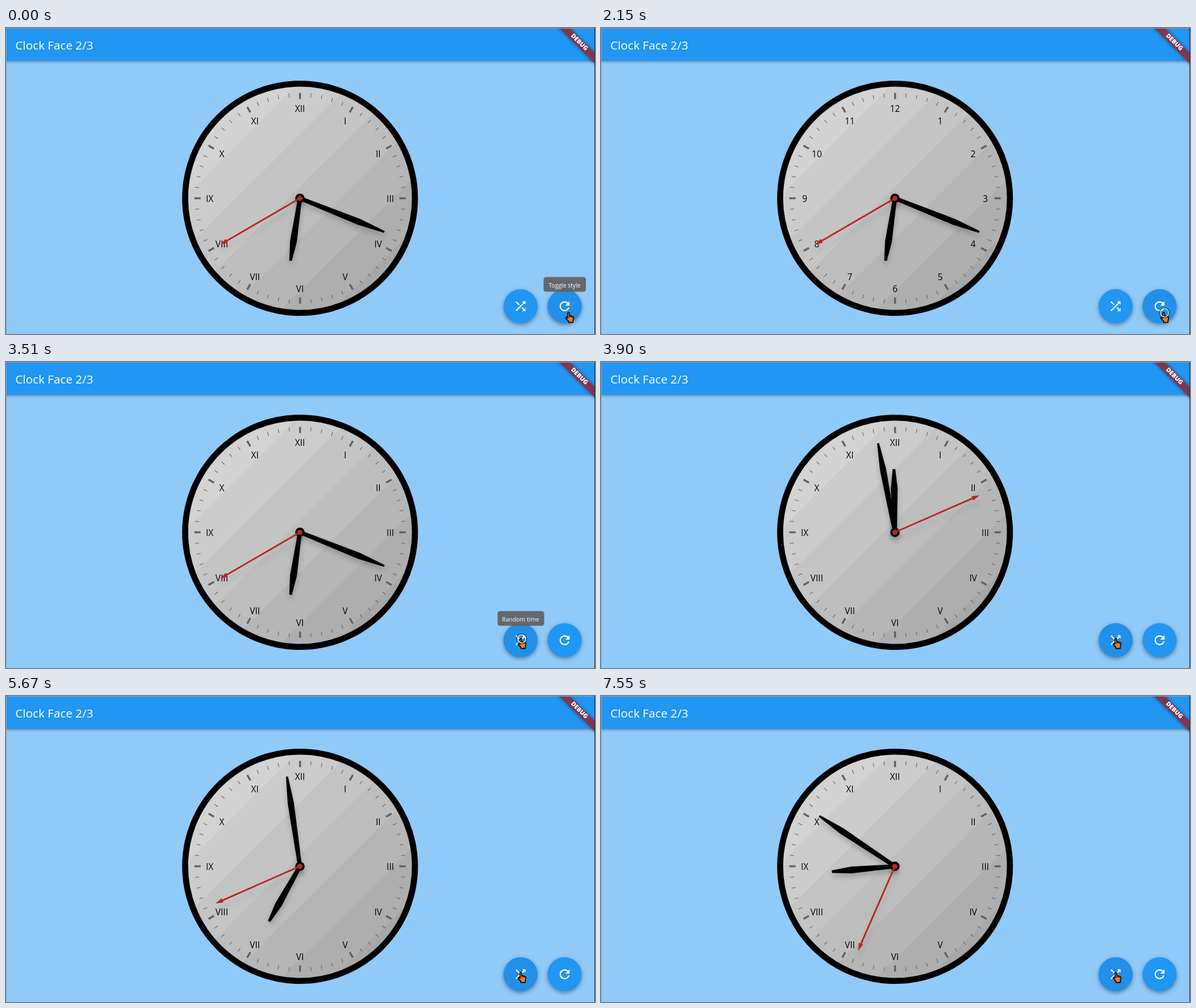
These frames come from a looping animation (1037x540 px, 8000 ms). An HTML page:

```html
<!DOCTYPE html>
<html lang="en">
<head>
<meta charset="utf-8">
<title>Clock Face</title>
<style>
  html, body { margin: 0; width: 100%; height: 100%; overflow: hidden; background: #90caf9; }
  svg { display: block; width: 1037px; height: 540px; font-family: "Open Sans", "Noto Sans", sans-serif; }
  .bar { filter: drop-shadow(0 2px 2px rgba(0,0,0,.32)); }
  .fab { fill: #2196f3; filter: drop-shadow(0 3px 3px rgba(0,0,0,.28)) drop-shadow(0 1px 4px rgba(0,0,0,.12)); }
  .fab.hover { fill: #2290e8; }
  .banner { filter: drop-shadow(0 0 3px rgba(0,0,0,.45)); }
  .low { filter: drop-shadow(0 6px 4px rgba(0,0,0,.2)); }
  .high { filter: drop-shadow(0 12px 4px rgba(0,0,0,.09)); }
  .numerals { font-size: 15.5px; text-anchor: middle; }
  .tip text { font-size: 10.4px; text-anchor: middle; fill: #fff; }
  .tip rect { fill: #616161; fill-opacity: .93; }
</style>
</head>
<body>
<svg viewBox="0 0 1037 540">
  <defs>
    <linearGradient id="steel" gradientUnits="userSpaceOnUse" x1="310" y1="93" x2="725" y2="508"></linearGradient>
    <clipPath id="window"><rect y="1" width="1036" height="539"/></clipPath>
    <clipPath id="buttons"><circle cx="906" cy="491" r="30"/><circle cx="983.5" cy="491" r="30"/></clipPath>
  </defs>
  <rect width="1037" height="540" fill="#90caf9"/>
  <rect class="bar" y="1" width="1037" height="57" fill="#2196f3"/>
  <text x="16.5" y="38" font-size="20.7" fill="#fff">Clock Face 2/3</text>

  <g clip-path="url(#window)">
    <g transform="translate(1036 1) rotate(45)">
      <rect class="banner" x="-60" y="30.2" width="120" height="13" fill="#7d3850"/>
    </g>
    <text transform="translate(1010 24.5) rotate(45)" y="4" font-size="10.8" font-weight="800" text-anchor="middle" fill="#fff">DEBUG</text>
  </g>

  <circle cx="517.7" cy="300.5" r="202.3" fill="url(#steel)" stroke="#000" stroke-width="10.6"/>
  <g id="ticks" transform="translate(517.7 300.5)" stroke="#616161"></g>
  <g id="numerals" class="numerals"></g>

  <g class="low"><g id="hour"><path d="M-3.5 0L-6-77L-2.3-111.5H2.3L6-77L3.5 0Z"/></g></g>
  <g class="low"><g id="minute"><path d="M-3.5 0L-5.5-112L-1.8-160H1.8L5.5-112L3.5 0Z"/></g></g>
  <circle class="low" cx="517.5" cy="300.5" r="8.3"/>
  <g class="high"><g id="second" fill="#b92626">
    <path d="M-1.5 0V-149H-4L0-162.5L4-149H1.5V0Z"/><circle r="4.5"/>
  </g></g>

  <circle id="fabShuffle" class="fab" cx="906" cy="491" r="30"/>
  <circle id="fabToggle" class="fab" cx="983.5" cy="491" r="30"/>
  <g fill="#fff">
    <path transform="translate(906 491) scale(1.09) translate(-12 -12)" d="M10.59 9.17L5.41 4 4 5.41l5.17 5.17 1.42-1.41zM14.5 4l2.04 2.04L4 18.59 5.41 20 17.96 7.46 20 9.5V4h-5.5zm.33 9.41l-1.41 1.41 3.13 3.13L14.5 20H20v-5.5l-2.04 2.04-3.13-3.13z"/>
    <path transform="translate(983.5 491) scale(1.09) translate(-12 -12)" d="M17.65 6.35C16.2 4.9 14.21 4 12 4c-4.42 0-7.99 3.58-7.99 8s3.57 8 7.99 8c3.73 0 6.84-2.55 7.73-6h-2.08c-.82 2.33-3.04 4-5.65 4-3.31 0-6-2.69-6-6s2.69-6 6-6c1.66 0 3.14.69 4.22 1.78L13 11h7V4l-2.35 2.35z"/>
  </g>
  <g clip-path="url(#buttons)"><circle id="ripple" fill="#fff" fill-opacity=".22"/></g>

  <g id="tipToggle" class="tip">
    <rect x="946.5" y="439.5" width="74.5" height="26" rx="4.3"/><text x="983.5" y="457.5">Toggle style</text>
  </g>
  <g id="tipRandom" class="tip">
    <rect x="865.5" y="439.5" width="82" height="26" rx="4.3"/><text x="906" y="457.5">Random time</text>
  </g>

  <g id="cursor">
    <path id="hand" stroke="#000" stroke-width="1.6" stroke-linejoin="round" d="M4 11V2.4Q4 .8 5.5 .8T7 2.4V6.6L12.6 7.7Q14.6 8.3 14.5 10.4L13.3 15V18.6H5.5V16.4L1 11.6Q.3 9.4 2.2 9.2Z"/>
    <path d="M7 6.6V10M9.6 7.3V10M12 7.8V10.5" stroke="#000" fill="none"/>
    <g id="ring" fill="none">
      <circle cx="7" cy="1.5" r="8.5" stroke="#123" stroke-width="1.4"/>
      <circle cx="7" cy="1.5" r="7.4" stroke="#fff" stroke-width="1.2"/>
    </g>
  </g>

  <path d="M0 .5H1037M.5 0V540" stroke="#8f9ca6"/>
  <path d="M1036.5 0V540" stroke="#1f2a33"/>
</svg>
<script>
const LOOP = 8000;
const $ = id => document.getElementById(id);

function add(parent, tag, attrs, text = "") {
  const el = document.createElementNS("http://www.w3.org/2000/svg", tag);
  for (const key in attrs) el.setAttribute(key, attrs[key]);
  el.textContent = text;
  parent.append(el);
  return el;
}

// Banded diagonal gradient: each band takes the grey at its middle.
const bandWidth = 92;
for (let sum = 429; sum < 1233; sum += bandWidth) {
  const grey = Math.round(224 - 66 * (sum + bandWidth / 2 - 403) / 830);
  for (const edge of [sum, sum + bandWidth])
    add($("steel"), "stop", { offset: (edge - 403) / 830, "stop-color": `rgb(${grey},${grey},${grey})` });
}

for (let i = 0; i < 60; i++) {
  const major = i % 5 === 0;
  add($("ticks"), "path", {
    d: `M0-186V${major ? -175 : -179}`,
    "stroke-width": major ? 3.4 : 1.1,
    transform: `rotate(${i * 6})`
  });
}

const roman = "XII I II III IV V VI VII VIII IX X XI".split(" ");
const labels = roman.map((_, i) => {
  const a = i * Math.PI / 6;
  return add($("numerals"), "text", { x: 517.6 + 159 * Math.sin(a), y: 307.2 - 159 * Math.cos(a) });
});

const toggleRipple = r => ({ ripple: [990, 501, r], dark: true });
const shuffleRipple = r => ({ ripple: [908, 490, r], dark: true });
const calm = { ripple: [0, 0, 0], dark: false, ring: false };

// Angles are hour, minute, second in degrees.
const steps = [
  [0, { ...calm, roman: true, hands: [188.5, 111.8, 239.8], cursor: [985, 501], hover: "toggle", tipToggle: 1, tipRandom: 0 }],
  [620, { ring: true }],
  [760, { ring: false, roman: false, tipToggle: 0, ...toggleRipple(18) }],
  [880, toggleRipple(50)],
  [1030, calm],
  [2150, { ring: true }],
  [2270, { dark: true }],
  [2420, { ring: false, roman: true }],
  [2570, { ...calm, cursor: [966, 502], hover: "" }],
  [2720, { cursor: [906, 502], hover: "shuffle", tipRandom: .72 }],
  [2840, { cursor: [903, 502], tipRandom: 1 }],
  [2960, { cursor: [899, 501] }],
  [3110, { cursor: [901, 487] }],
  [3510, { ring: true }],
  [3630, { ring: false, tipRandom: 0, hands: [359.1, 349.3, 66.3], ...shuffleRipple(18) }],
  [3750, shuffleRipple(50)],
  [3900, calm],
  [5270, { ring: true }],
  [5520, { ring: false, hands: [209.2, 351.8, 246.2], ...shuffleRipple(50) }],
  [5670, calm],
  [7160, { ring: true }],
  [7280, { ring: false, hands: [265.1, 303.7, 203.6], ...shuffleRipple(18) }],
  [7400, shuffleRipple(50)],
  [7550, calm]
];

function draw(t) {
  const s = {};
  for (const [at, change] of steps) if (at <= t) Object.assign(s, change);

  labels.forEach((el, i) => {
    const label = s.roman ? roman[i] : String(i || 12);
    if (el.textContent !== label) el.textContent = label;
  });
  ["hour", "minute", "second"].forEach((id, i) =>
    $(id).setAttribute("transform", `translate(517.5 300.5) rotate(${s.hands[i]})`));
  ["cx", "cy", "r"].forEach((key, i) => $("ripple").setAttribute(key, s.ripple[i]));

  $("fabToggle").classList.toggle("hover", s.hover === "toggle");
  $("fabShuffle").classList.toggle("hover", s.hover === "shuffle");
  $("tipToggle").style.opacity = s.tipToggle;
  $("tipRandom").style.opacity = s.tipRandom;
  $("cursor").setAttribute("transform", `translate(${s.cursor})`);
  $("hand").setAttribute("fill", s.dark ? "#a55a20" : "#f47b1c");
  $("ring").style.opacity = s.ring ? 1 : 0;
}

const start = performance.now();
function tick() {
  draw((performance.now() - start) % LOOP);
  requestAnimationFrame(tick);
}
tick();
</script>
</body>
</html>
```
